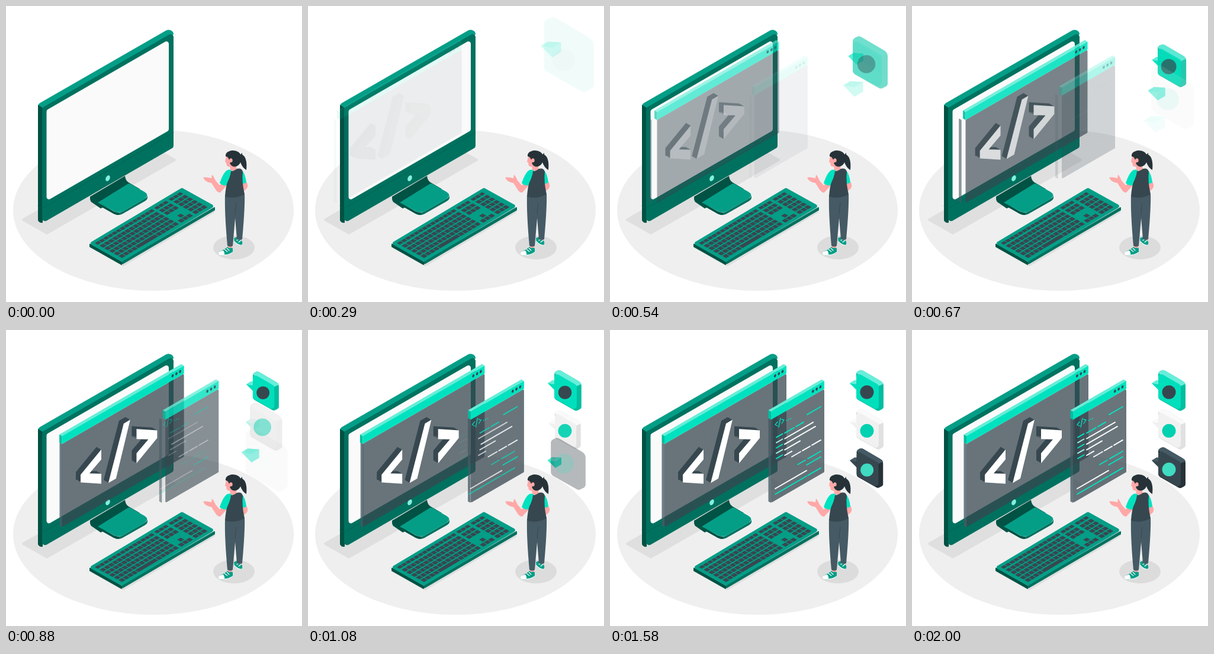
These frames come from a looping animation (500x500 px, 2040 ms). An HTML page with a canvas:

```html
<!DOCTYPE html>
<html lang="en">
<head>
<meta charset="utf-8">
<title>Web development</title>
<style>
html, body { margin: 0; width: 100%; height: 100%; overflow: hidden; background: #fff; }
canvas { display: block; width: 100vw; height: 100vh; }
</style>
</head>
<body>
<canvas id="stage"></canvas>
<script>
const LOOP = 2040;
const ISO = 0.577;
const DARK = '#37474f', INK = '#263238', SLATE = '#455a64', SKIN = '#ffa8a7', GLASS = 'rgba(55,71,79,.75)';
const MINT = '#00e2bf', LIGHT = '#64eed8', TOP = '#049e87', FRONT = '#00715f', SIDE = '#005244';

const canvas = document.getElementById('stage');
const ratio = window.devicePixelRatio || 1;
canvas.width = canvas.height = 500 * ratio;
const c = canvas.getContext('2d');

// Motion: ease in with a small overshoot, then settle at zero
function ease(u) {
  u = Math.max(0, Math.min(1, u));
  return u * u * (3 - 2 * u);
}
const spring = (k, from, over) =>
  k < 16 ? from + (over - from) * ease(k / 16) : over * (1 - ease((k - 16) / 9));
const fade = k => ease(k / 16) ** 1.3;

// Drawing helpers
function path(d, color) {
  c.fillStyle = color;
  c.fill(new Path2D(d));
}
function stroke(d, color, w) {
  c.strokeStyle = color;
  c.lineWidth = w;
  c.lineCap = c.lineJoin = 'round';
  c.stroke(new Path2D(d));
}
function oval(x, y, rx, ry, color, turn = 0) {
  c.beginPath();
  c.ellipse(x, y, rx, ry, turn, 0, 7);
  c.fillStyle = color;
  c.fill();
}
// Parallelogram spanned by (ax, ay) and (bx, by) from a corner
function quad(x, y, ax, ay, bx, by, color, r = 0) {
  const p = [[x, y], [x + ax, y + ay], [x + ax + bx, y + ay + by], [x + bx, y + by]];
  c.beginPath();
  c.moveTo(x + bx / 2, y + by / 2);
  p.forEach(([px, py], i) => {
    const [qx, qy] = p[(i + 1) % 4];
    c.arcTo(px, py, (px + qx) / 2, (py + qy) / 2, r);
  });
  c.closePath();
  c.fillStyle = color;
  c.fill();
}
// Upright faces: wall rises to the right, edge falls to the right
const wall = (x, y, w, h, color, r) => quad(x, y, w, -w * ISO, 0, h, color, r);
const edge = (x, y, w, h, color, r) => quad(x, y, w, w * ISO, 0, h, color, r);

function layer(alpha, dx, draw) {
  if (alpha <= 0) return;
  c.save();
  c.globalAlpha *= alpha;
  c.translate(dx, 0);
  draw();
  c.restore();
}

function monitor() {
  quad(25, 361, 220, -126, 44, 25, '#dfdfdf', 2);
  // stand
  path('M142 322L201 287Q202 295 207 298L226 309L160 342L144 331Q142 329 142 322Z', SIDE);
  path('M142 324L182 347Q190 351 197 347L235 325Q239 323 239 318V324Q239 327 234 330L197 351Q190 355 182 351L145 330Q142 328 142 324Z', FRONT);
  path('M142 324L182 347Q187 349 191 349V353Q186 353 182 351L145 330Q142 328 142 324Z', SIDE);
  path('M155 332L205 301Q208 299 211 301L234 314Q242 319 235 325L197 347Q190 350 183 347Z', TOP);
  // case
  path('M54 169Q54 166 57 164L271 41Q276 39 280 42Q283 44 283 48L61 173Z', TOP);
  path('M54 167L62 172V366Q56 367 54 362Z', SIDE);
  wall(61, 172, 222, 195, FRONT, 5);
  stroke('M54 338L61 342L283 214', '#00614f', 0.8);
  wall(68.5, 176, 206.5, 153.5, '#fafafa', 4);
  oval(172, 291, 3.4, 5.2, '#83f0de', 0.45);
}

function keyboard() {
  quad(138, 406, 159, -94, 60, 34, '#dedede', 4);
  quad(141, 401, 55, 31, 0, 6, SIDE, 1);
  quad(196, 431, 157, -92, 0, 6, FRONT, 1);
  quad(140, 401, 157, -94, 56, 31, TOP, 3);
  c.save();
  c.transform(156, -93, 55, 30, 141, 401);
  c.fillStyle = DARK;
  const step = 0.0445;
  for (let row = 0; row < 6; row++) {
    const v = 0.08 + row * 0.145;
    const key = (u, w = 0.038) => c.fillRect(u, v, w, row ? 0.11 : 0.09);
    for (let i = 0; i < 14; i++) {
      const space = row === 5 && i > 3 && i < 9;
      if (!space) key(0.03 + i * step);
    }
    if (row === 5) key(0.03 + 4 * step, 5 * step - 0.007);
    for (let i = 0; i < 3; i++) {
      const nav = row < 3 || row === 5 || (row === 4 && i === 1);
      if (nav) key(0.672 + i * step);
      key(0.828 + i * step);
    }
  }
  c.restore();
}

function person() {
  oval(385, 408, 35, 20, '#dcdcdc');
  // shoes
  path('M385 392L390 390L398 396Q401 402 397 404Q391 405 386 399Z', TOP);
  stroke('M386 398Q391 404 397 404M390 396L394 393M393 399L397 396', '#fff', 1.2);
  path('M360 415Q367 413 374 407L383 409V417Q375 421 366 422Q358 421 360 415Z', TOP);
  path('M360 415L367 413Q370 417 369 421Q360 423 359 418Z', '#fff');
  stroke('M369 411L374 415M373 409L377 413M366 421Q376 421 383 416', '#fff', 1.1);
  // legs
  path('M374 402H383L382 408L376 409ZM391 389H398L397 396L391 394Z', SKIN);
  path('M383 325L403 317Q404 338 399 394Q395 396 390 394L386 345Z', SLATE);
  path('M370 319L402 318Q400 328 389 336L383 405Q379 408 374 405Q369 350 370 319Z', SLATE);
  stroke('M389 333Q387 344 387 352', DARK, 0.8);
  // arms
  path('M399 296L406 297Q410 303 407 308L399 315Z', SKIN);
  path('M333 290Q336 288 347 291L348 285Q350 286 354 295L361 303L366 298L373 303L362 315Q358 316 354 310L347 299Q337 298 333 290Z', SKIN);
  // torso
  path('M374 277Q367 281 361 299Q365 304 374 303L382 287L381 276ZM398 277Q404 282 406 298Q403 301 396 300Z', MINT);
  path('M378 268L388 266L390 276Q384 280 379 277Z', SKIN);
  path('M380 279Q385 279 390 275Q398 273 400 280Q398 296 403 318Q387 327 370 322Q371 306 374 298Q379 288 380 279Z', DARK);
  // head
  path('M372 254L384 251L389 266Q381 275 373 270L372 265L370 263Z', SKIN);
  path('M396 251L399 248L399 251Q408 256 406 277Q399 273 396 264Z', INK);
  path('M371 254Q370 246 382 244Q396 244 398 256Q397 268 389 271Q381 273 378 265Q383 263 382 258Q378 256 377 260Q375 254 371 254Z', INK);
  oval(380.5, 261, 2.2, 3, SKIN);
}

// Glass slab with a bright header; its left side trails behind the face
function browser(x, y, w, k, from) {
  const depth = 4.5, head = 13.5, height = 154;
  const lift = depth * ISO;
  layer(fade(k - 1), spring(k - 2, from, 3), () =>
    edge(x - depth, y + head - lift, depth, height - head, 'rgba(69,90,100,.78)'));
  layer(fade(k), spring(k, from, 3), () => {
    wall(x, y + head, w, height - head, GLASS, 1.5);
    quad(x - depth, y - lift, w, -w * ISO, depth, lift, LIGHT);
    edge(x - depth, y - lift, depth, head, '#00bd9f');
    wall(x, y, w, head, MINT);
    for (let i = 0; i < 3; i++) {
      const dx = w - 6.5 - i * 6.3;
      oval(x + dx, y + 6.3 - dx * ISO, 1.7, 2.7, DARK, 0.4);
    }
  });
}

// Code sign: flat shapes on the wall plane, pushed back for thickness
function solid(x, y, flip, points) {
  const face = new Path2D('M' + points.map(([px, py]) => `${px * flip} ${py - px * flip * ISO}`).join('L') + 'Z');
  const body = new Path2D();
  for (let d = 0; d <= 8; d += 0.5) body.addPath(face, new DOMMatrix([1, 0, 0, 1, -d, -d * ISO]));
  c.translate(x, y);
  c.fillStyle = DARK;
  c.fill(body);
  c.fillStyle = '#fff';
  c.fill(face);
}
const chevron = [[0, -6.5], [35, -29], [35, -12], [15, 0], [35, 12], [35, 29], [0, 6.5]];
const slash = [[-13, 34.5], [13, -51], [24, -51], [0, 34.5]];

function sign(k) {
  const part = (lag, x, flip, shape) => layer(fade(k - lag / 2), spring(k - lag, -46, 3), () =>
    solid(x, 251 - (x - 123) * ISO, flip, shape));
  part(2, 123, 1, chevron);
  part(2.5, 183, 1, slash);
  part(3, 253, -1, chevron);
}

// Word spans (from, to) of each row of code
const rows = [
  [333, 356], [295, 311, 314, 327], [295, 343], [295, 347], [295, 321], [295, 307],
  [307, 322, 325, 338, 341, 356], [], [317, 330, 334, 356], [332, 356], [279, 332], [279, 332, 334, 356]
];

function code(k) {
  const reveal = (lag, draw) => layer(fade(k - lag), spring(k - lag, -28, 1), draw);
  const word = (row, from, to, color, lag) => reveal(lag, () => {
    const y = 178 + row * 9.4;
    stroke(`M${from} ${y - (from - 272) * ISO}L${to} ${y - (to - 272) * ISO}`, color, 1.9);
  });
  reveal(10, () => {
    stroke('M283 155L279 160L283 162M288 149L285 164M290 151L294 152L290 158', MINT, 1.3);
    for (let i = 0; i < 3; i++) oval(298.5 + i * 3.3, 152.8 - i * 1.6, 0.9, 1.1, MINT);
  });
  rows.forEach((spans, row) => {
    const color = (row > 1 && row < 7) || row === 10 ? '#fff' : MINT;
    for (let i = 0; i < spans.length; i += 2) word(row, spans[i], spans[i + 1], color, 10.5 + row % 3);
  });
  for (let i = 0; i < 5; i++) word(0.85 + i * 0.95, 280, 290.5, i % 2 ? '#a5f3e5' : MINT, 19);
}

// Speech cards, stacked downwards
const cards = [
  { face: '#00dfbc', top: '#68eeda', side: '#00bea0', mark: DARK },
  { face: '#f1f1f1', top: '#fafafa', side: '#e1e1e1', mark: '#00d1b0' },
  { face: DARK, top: SLATE, side: INK, mark: '#3fdcc2' }
];

function grow(k, extra, alpha, x, y, draw) {
  layer(alpha, 0, () => {
    const s = 1 + spring(k, extra, -0.05);
    c.translate(x, y);
    c.scale(s, s);
    c.translate(-x, -y);
    draw();
  });
}
function tip(face, top) {
  path('M405 90L413 85L428 86V97L418 103Z', face);
  path('M405 90L413 85L428 86L418 92Z', top);
}

function card(o, i, k) {
  const kc = k - i * 7.5, kt = k + 1 - i * 5.5;
  const firm = ease((kc - 8) / 5);
  c.save();
  c.translate(0, i * 65.3);
  grow(kt, 0.65, fade(kt), 429, 136, () => {
    layer(1 - firm, 0, () => tip(MINT, LIGHT));
    layer(firm, 0, () => tip(o.face, o.top));
  });
  grow(kc, 1 - i * 0.2, fade(kc) ** 1.2, 437, 126, () => {
    path('M416 74Q416 71 420 69L422 68Q425 67 428 69L457 86Q462 89 462 94V130Q462 133 457 135Q453 138 449 135L419 118Q416 116 416 113Z', o.side);
    layer(firm, 0, () => {
      path('M416 73Q418 69 422 68Q425 67 428 69L457 86Q461 88 462 91L453 95Z', o.top);
      edge(416, 71, 38, 44, o.face, 5);
    });
  });
  grow(kc - 2, 0.7, fade(kc - 2), 437, 126, () => oval(434, 105, 11.5, 11.5, o.mark));
  c.restore();
}

function render(t) {
  // 24 pictures a second on a 10 ms clock, after a short hold
  const tick = Math.floor(t / 10) * 10 + 9.99;
  const k = Math.floor((tick - 130) * 24 / 1000);
  c.setTransform(ratio, 0, 0, ratio, 0, 0);
  c.fillStyle = '#fff';
  c.fillRect(0, 0, 500, 500);
  oval(249, 345, 237, 136, '#efefef');
  monitor();
  keyboard();
  browser(92, 179, 206, k, -46);
  sign(k);
  browser(272, 138, 90, k - 6, -34);
  code(k);
  person();
  cards.forEach((o, i) => card(o, i, k));
}

const start = performance.now();
function loop() {
  render((performance.now() - start) % LOOP);
  requestAnimationFrame(loop);
}
loop();
</script>
</body>
</html>
```
